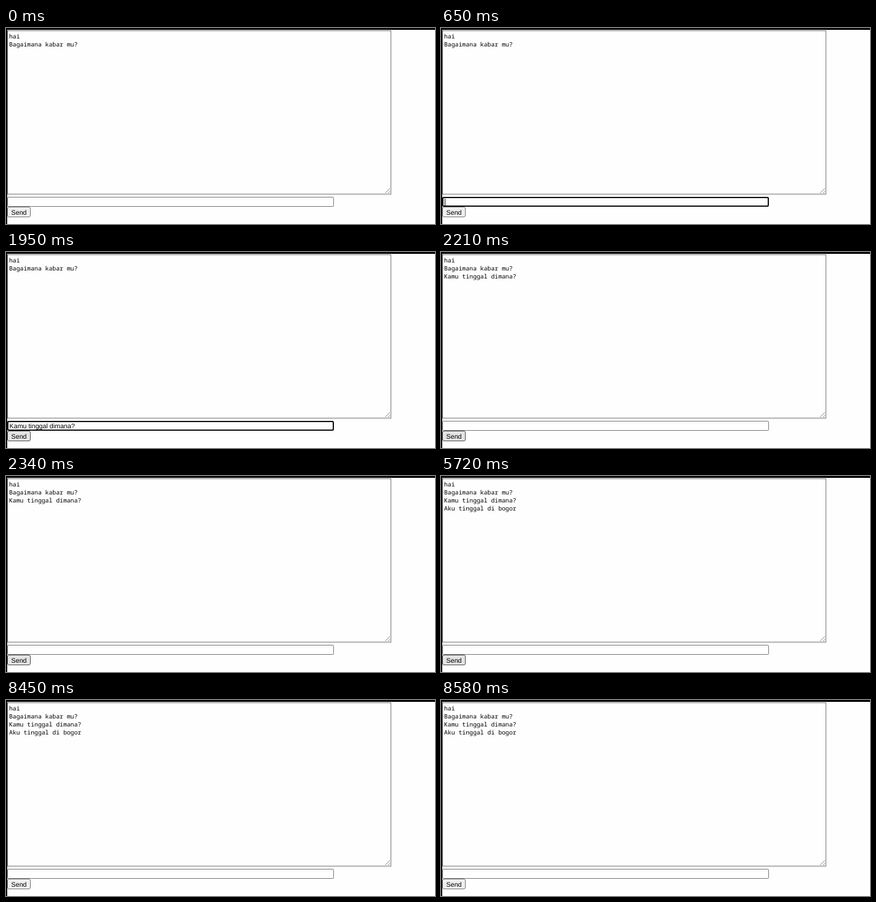
Animation, 696 px wide and 318 px high, one loop 9.1 s. Source, as an HTML page:

```html
<!DOCTYPE html>
<html lang="id">
<head>
<meta charset="utf-8">
<title>Chat</title>
<style>
  html, body { margin: 0; width: 100%; height: 100%; overflow: hidden; background: #fefefe; }
  svg { display: block; width: 696px; height: 318px; }
  text { fill: #000; text-rendering: geometricPrecision; white-space: pre; }
  .log { font: 9.77px "Noto Sans Mono", "DejaVu Sans Mono", monospace; }
  .ui { font: 10.667px "Liberation Sans", Arial, sans-serif; }
  .box { fill: #fefefe; stroke: #767676; }
  #button { fill: #efefef; stroke: #767676; }
  #button.hover { fill: #e3e3e3; stroke: #4a4a4a; }
</style>
</head>
<body>
<svg viewBox="0 0 696 318">
  <rect width="696" height="318" fill="#fefefe"/>
  <path d="M0 0H696V3H2V318H0Z"/>

  <rect class="box" x="2.5" y="4.5" width="622" height="265"/>
  <path d="M615 268L623 260M620 268L623 265" fill="none" stroke="#666" stroke-width=".8"/>
  <g id="log"></g>

  <rect class="box" x="2.5" y="274.5" width="529" height="15" rx="1"/>
  <rect id="ring" x="3" y="275" width="528" height="14" rx="2" fill="none" stroke="#101010" stroke-width="2"/>
  <rect id="caret" x="6" y="277" width="1" height="11"/>
  <text id="draft" class="ui" x="5.6" y="286">Kamu tinggal dimana?</text>

  <rect id="button" x="2.5" y="290.5" width="37" height="16" rx="2.5"/>
  <text class="ui" x="8.6" y="303">Send</text>
</svg>
<script>
  const LOOP = 9100;
  const FOCUS = 390, CARET = 650, TYPED = 1170, HOVER = 1820, SENT = 2210, REPLY = 5720, LEAVE = 7410;
  const lines = [
    ["hai", 0],
    ["Bagaimana kabar mu?", 0],
    ["Kamu tinggal dimana?", SENT],
    ["Aku tinggal di bogor", REPLY]
  ];

  const get = id => document.getElementById(id);
  const show = (el, on) => { el.style.visibility = on ? "visible" : "hidden"; };
  const ring = get("ring"), caret = get("caret"), draft = get("draft"), button = get("button");

  const rows = lines.map(([str, from], i) => {
    const el = document.createElementNS("http://www.w3.org/2000/svg", "text");
    el.setAttribute("class", "log");
    el.setAttribute("x", 5);
    el.setAttribute("y", 17 + 13 * i);
    el.textContent = str;
    get("log").append(el);
    return { el, from };
  });

  function draw(t) {
    const within = (a, b) => t >= a && t < b;
    rows.forEach(({ el, from }) => show(el, t >= from));
    show(ring, within(FOCUS, SENT));
    show(caret, within(CARET, TYPED));
    show(draft, within(TYPED, SENT));
    button.classList.toggle("hover", within(HOVER, LEAVE));
  }

  const start = performance.now();
  function tick() {
    draw((performance.now() - start) % LOOP);
    requestAnimationFrame(tick);
  }
  draw(0);
  requestAnimationFrame(tick);
</script>
</body>
</html>
```
